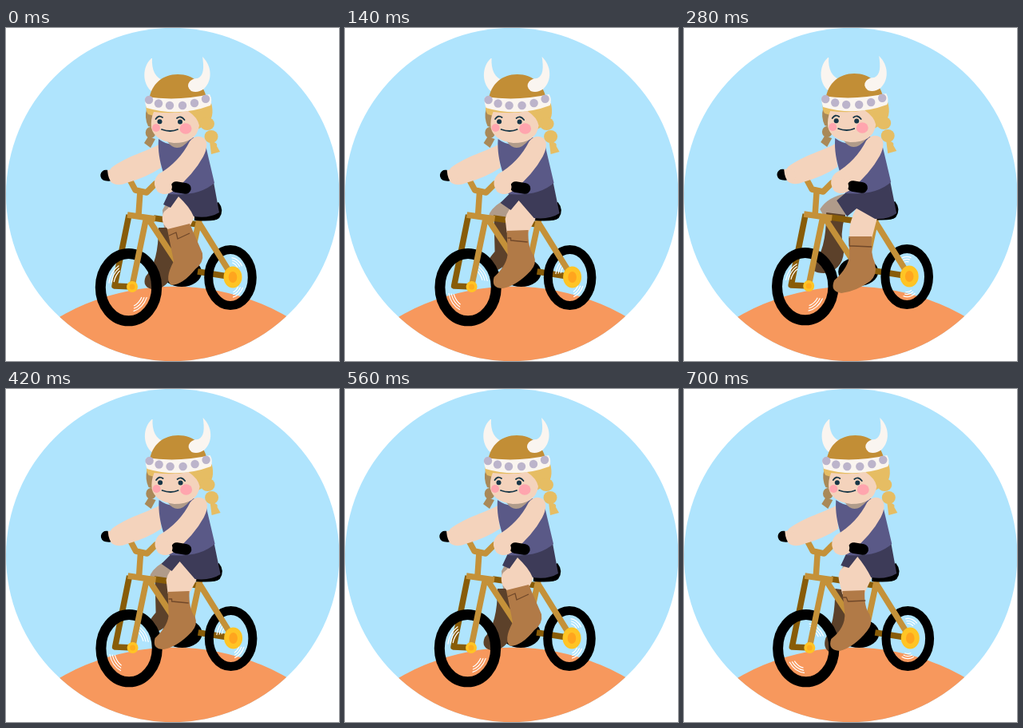
An HTML page that plays this animation: 417x417 px, repeating every 0.84 s.

```html
<!DOCTYPE html>
<html lang="en">
<head>
<meta charset="utf-8">
<title>Viking cyclist</title>
<style>
  html, body { margin: 0; width: 100%; height: 100%; overflow: hidden; background: #fff; }
  svg { display: block; width: 100vw; height: 100vh; }
  .line { fill: none; stroke-linejoin: round; }
  .gold { stroke: #c49139; stroke-width: 7.5; }
  .bronze { stroke: #885c08; stroke-width: 7.5; }
  .grip { stroke: #000; stroke-width: 13.5; stroke-linecap: round; }
  .skin { fill: #f4d3bc; }
  .hair { fill: #e6bd63; }
  .shade { fill: #b09b8a; }
  .horn { fill: #faf5f0; }
  .shine { stroke: #fff; stroke-width: 1.2; }
  .ink { stroke: #173647; stroke-width: 1.8; stroke-linecap: round; }
</style>
</head>
<body>
<svg viewBox="0 0 417 417">
  <defs>
    <clipPath id="disc"><circle cx="208.7" cy="208.5" r="208.7"/></clipPath>
  </defs>
  <g clip-path="url(#disc)">
    <rect width="417" height="417" fill="#afe4fd"/>
    <circle cx="210" cy="611.5" r="287.8" fill="#f7985d"/>
  </g>

  <g id="rider">
    <!-- far leg, crank and wheels -->
    <ellipse cx="220" cy="306" rx="25" ry="18"/>
    <path id="farThigh" class="shade"/>
    <path id="farBoot" fill="#5c412a"/>
    <path class="line bronze" d="M154 234L136 323L158 324M240 305L284 312"/>
    <g class="line" stroke="#000">
      <ellipse cx="153.5" cy="324.7" rx="35.2" ry="42.1" stroke-width="13"/>
      <ellipse cx="281" cy="312.5" rx="27.3" ry="35" stroke-width="11"/>
    </g>
    <path id="shine" class="line shine"/>

    <!-- bicycle frame -->
    <path class="line bronze" d="M185 238L240 246"/>
    <path class="line gold" d="M152 234L187 239M176 236L158 323M178 239L213 292M242 240L230 296M241 243L284 312M168 204L166 234"/>
    <path class="line gold" stroke-linecap="round" d="M155 190L162 203L176 206L187 195"/>
    <path d="M236 236L266 218Q274 228 267 238Q262 243 236 241Z"/>
    <circle cx="158" cy="324" r="7" fill="#ffc425"/>
    <circle cx="158" cy="324" r="3.5" fill="#ffad1d"/>
    <ellipse cx="284" cy="312" rx="11.5" ry="13.5" fill="#ffc425"/>
    <ellipse cx="284" cy="312" rx="5.3" ry="7" fill="#ffa51e"/>

    <!-- body and near leg -->
    <path id="thigh" class="skin"/>
    <path id="shortsShape" fill="#3d3b58"/>
    <path id="boot" fill="#b17a47"/>
    <path id="strap" class="line" stroke="#70482a" stroke-width="1.3"/>
    <path class="skin" d="M191 146C178 154 152 160 132 175Q124 186 132 193Q139 199 151 194Q176 187 194 175Z"/>
    <path fill="#5a5987" d="M191 139Q211 154 234 137L249 143L261 194Q242 211 204 208C202 188 189 170 191 139Z"/>
    <path class="shade" d="M202 142Q214 159 230 140Z"/>
    <path class="skin" d="M230 142Q238 132 248 138Q255 145 247 161Q235 183 211 203Q198 213 189 203Q182 193 191 183Q217 168 230 142Z"/>
    <path class="line grip" d="M125 184.5L129 185M213 199L225 201"/>
    <path class="skin" d="M127 178Q139 176 143 184Q140 196 133 194Q128 190 127 178ZM191 188Q207 188 208 199Q208 206 198 208Q187 207 187 197Z"/>

    <!-- head -->
    <g fill="#a98958">
      <path d="M176 102L188 106V126L178 123Q173 112 176 102Z"/>
      <ellipse cx="181" cy="131" rx="6.3" ry="7"/>
      <path d="M178 136L187 139L181 150L173 144Z"/>
    </g>
    <g class="hair">
      <path d="M176 94H257Q262 112 251 121L238 128L192 112L178 108Q174 103 176 94Z"/>
      <ellipse cx="252" cy="120" rx="9" ry="8"/>
      <ellipse cx="257" cy="136" rx="8.5" ry="8"/>
      <path d="M255 142Q266 143 264 148L268 155L257 158Z"/>
    </g>
    <path class="skin" d="M185 105Q210 108 228 104Q240 112 242 122Q239 144 210 144Q186 141 182 125Q181 114 185 105Z"/>
    <g fill="#ffa5ae">
      <ellipse cx="188" cy="125" rx="5" ry="5"/>
      <ellipse cx="225" cy="126" rx="7.5" ry="6.7"/>
    </g>
    <g fill="#173647">
      <circle cx="192.5" cy="117.3" r="3"/>
      <circle cx="218" cy="117.6" r="3"/>
    </g>
    <path class="line ink" d="M187.5 114Q191 108.5 196 112M214 113Q219 109 223.5 115M195 127Q206 131 215 127"/>
    <path class="horn" d="M182 38C170 49 171 70 182 79L198 66C187 63 182 52 183 38Z"/>
    <path fill="#c28e36" d="M179 90C182 70 196 58 215 58C235 58 248 71 251 88Z"/>
    <path class="horn" d="M246 36C258 47 259 66 248 76Q240 82 232 79Q225 73 230 67Q234 63 240 63C248 60 248 49 246 36Z"/>
    <path class="horn" d="M175 86Q215 92 255 83Q259 90 256 97Q216 112 176 100Q173 92 175 86Z"/>
    <g id="studs" fill="#bcb4cb"></g>
  </g>
</svg>
<script>
const byId = id => document.getElementById(id);

const upperPose = {
  shortsShape: "M204 206L197 221L206 225L216 211Q230 224 235 236Q254 239 267 231L260 193Z",
  thigh: "M217 209Q206 224 198 230Q194 236 197 245L204 254L231 247L236 237Q230 220 217 209Z",
  boot: "M202 252L230 245Q240 268 246 282Q248 294 237 302Q222 321 207 322Q198 315 210 292Z",
  strap: "M204 260L213 256L215 264L230 257",
  farThigh: "M203 215L196 228L198 251L208 251Z",
  farBoot: "M191 250L207 250L213 296Q207 324 186 328Q169 325 175 311Q191 294 191 250Z",
  shine: [215, 50, 300, 55]
};
const middlePose = {
  shortsShape: "M208 205L194 219L207 228L217 216L236 238Q256 240 268 232L260 193Z",
  thigh: "M217 214Q202 228 200 239L202 256L229 256L238 239Z",
  boot: "M202 254L229 253Q228 276 236 285Q240 295 232 304Q214 323 197 326Q182 326 186 312Q204 295 203 280Z",
  strap: "M203 263H207V266L228 268",
  farThigh: "M196 217Q180 227 179 237L205 242L211 223Z",
  farBoot: "M186 241L206 244L205 289Q195 306 179 305Q171 298 187 280Z",
  shine: [140, 320, 215, 50]
};
const lowerPose = {
  shortsShape: "M206 206L193 217L206 237L218 227L241 240Q258 241 268 233L260 193Z",
  thigh: "M218 226Q208 242 209 264L237 264L244 238Z",
  boot: "M208 262L237 262Q235 283 241 296Q244 310 235 318Q217 331 199 333Q184 331 190 317Q208 301 209 285Z",
  strap: "M209 264V274H214L237 275",
  farThigh: "M206 208Q182 212 172 228L177 237L203 238L208 224Z",
  farBoot: "M180 232L204 235Q196 259 202 281Q200 305 177 308Q159 308 163 296Q180 282 180 232Z",
  shine: [220, 55, 262, 80]
};
const returningPose = {
  shortsShape: "M204 206L197 221L207 224L218 210Q228 222 235 236Q254 239 267 231L260 193Z",
  thigh: "M219 208Q206 219 197 226Q193 232 195 241L199 257L227 255L236 236Z",
  boot: "M199 253L227 252Q226 273 233 282Q238 294 230 303Q214 323 196 328Q180 327 185 313Q203 299 202 281Z",
  strap: "M198 261H204L206 266L228 265",
  farThigh: "M203 215L196 230L198 252L207 252Z",
  farBoot: "M190 250L205 252L207 289Q203 320 184 330Q174 325 178 312Q190 294 190 250Z",
  shine: [120, 305, 285, 90]
};

// Each step holds a leg pose and a slight shake of the whole rider.
const steps = [
  [upperPose, 0, 0], [middlePose, .6, 0], [lowerPose, -1.8, -1],
  [middlePose, .6, 0], [upperPose, 0, 0], [returningPose, -.7, 0]
];

function arc(cx, cy, rx, ry, degrees, spread) {
  const point = offset => {
    const angle = (degrees + offset) * Math.PI / 180;
    return `${cx + rx * Math.cos(angle)} ${cy + ry * Math.sin(angle)}`;
  };
  return `M${point(-spread)}A${rx} ${ry} 0 0 1 ${point(spread)}`;
}

function shinePath(angles) {
  return angles.map((angle, i) => [0, 3, 6].map(inset => i < 2
    ? arc(153.5, 324.5, 25 - inset, 31 - inset, angle, 26 - inset)
    : arc(281, 312.5, 18 - inset, 25 - inset, angle, 25 - inset)
  ).join("")).join("");
}

byId("studs").innerHTML = [[179, 90], [191, 94.5], [205, 97], [221, 97], [236, 94], [250, 88.7]]
  .map(([x, y]) => `<circle cx="${x}" cy="${y}" r="5.2"/>`).join("");

let shown = -1;
function draw(now) {
  const index = Math.floor(now / 140) % steps.length;
  if (index !== shown) {
    const [pose, dx, dy] = steps[index];
    for (const [id, value] of Object.entries(pose))
      byId(id).setAttribute("d", id === "shine" ? shinePath(value) : value);
    byId("rider").setAttribute("transform", `translate(${dx} ${dy})`);
    shown = index;
  }
}

const start = performance.now();
function tick() {
  draw(performance.now() - start);
  requestAnimationFrame(tick);
}
tick();
</script>
</body>
</html>
```
